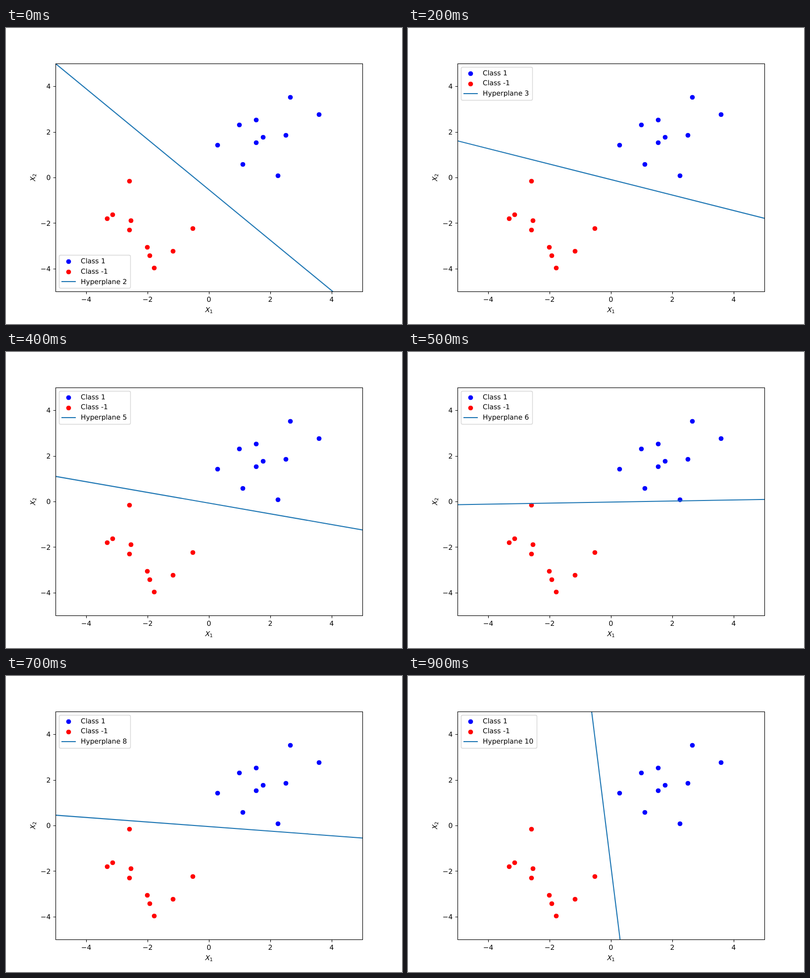
These frames come from a looping animation (800 by 600 pixels, 1 s). An HTML page:

```html
<!DOCTYPE html>
<html lang="en">
<head>
<meta charset="utf-8">
<title>Separating hyperplanes</title>
<style>
  html, body { margin: 0; width: 100%; height: 100%; overflow: hidden; background: #fff; }
  svg { display: block; width: 800px; height: 600px; }
  text { font: 13.89px "DejaVu Sans", Verdana, sans-serif; fill: #000; text-rendering: geometricPrecision; }
  .sub { font-size: 9.72px; }
  .axis { fill: none; stroke: #000; stroke-width: 1.11; }
  .plane { stroke: #1f77b4; stroke-width: 2.083; }
  .box { fill: #fff; fill-opacity: .8; stroke: #ccc; stroke-opacity: .8; stroke-width: 1.39; }
</style>
</head>
<body>
<svg viewBox="0 0 800 600">
  <defs><clipPath id="area"><rect x="100" y="72" width="620" height="462"/></clipPath></defs>
  <g id="dots"></g>
  <g id="planes" clip-path="url(#area)"></g>
  <g id="axes"><rect class="axis" x="100.5" y="72.5" width="620" height="462"/></g>
  <g id="legends"></g>
</svg>
<script>
const STEP = 100, COUNT = 10, SIZE = 10;
const BLUE = '#00f', RED = '#f00';
const LEFT = 107.5, TOP = 78.94, HEIGHT = 67, LOW_SHIFT = 381.12, ROW = 20.94;

const px = x => 410 + 62 * x;
const py = y => 303 - 46.2 * y;
const get = id => document.getElementById(id);

// Mersenne Twister, 53-bit floats in [0, 1)
function twister(seed) {
  const N = 624, s = new Uint32Array(N);
  let pos = N;
  s[0] = seed;
  for (let i = 1; i < N; i++) s[i] = Math.imul(1812433253, s[i - 1] ^ s[i - 1] >>> 30) + i;
  function next() {
    if (pos === N) {
      for (let i = 0; i < N; i++) {
        const y = s[i] & 0x80000000 | s[(i + 1) % N] & 0x7fffffff;
        s[i] = s[(i + 397) % N] ^ y >>> 1 ^ (y & 1 ? 0x9908b0df : 0);
      }
      pos = 0;
    }
    let y = s[pos++];
    y ^= y >>> 11;
    y ^= y << 7 & 0x9d2c5680;
    y ^= y << 15 & 0xefc60000;
    return (y ^ y >>> 18) >>> 0;
  }
  return () => ((next() >>> 5) * 2 ** 26 + (next() >>> 6)) / 2 ** 53;
}

const random = twister(42);

// A pair of normal numbers by the polar method
function normalPair() {
  let a, b, r;
  do {
    a = 2 * random() - 1;
    b = 2 * random() - 1;
    r = a * a + b * b;
  } while (r >= 1 || r === 0);
  const f = Math.sqrt(-2 * Math.log(r) / r);
  return [f * b, f * a];
}

const cloud = mean => Array.from({ length: SIZE }, () => normalPair().map(v => v + mean));
const dotProduct = (w, p) => w[0] * p[0] + w[1] * p[1];

// Draws random directions until one separates the clouds; the line lies midway
function randomPlane(blue, red) {
  for (;;) {
    const w = normalPair();
    const high = Math.min(...blue.map(p => dotProduct(w, p)));
    const low = Math.max(...red.map(p => dotProduct(w, p)));
    if (high > low) return { w, mid: (high + low) / 2 };
  }
}

function add(parent, tag, attrs, text) {
  const el = document.createElementNS('http://www.w3.org/2000/svg', tag);
  for (const key in attrs) el.setAttribute(key, attrs[key]);
  if (text !== undefined) el.textContent = text;
  parent.append(el);
  return el;
}

function dot(parent, x, y, fill) {
  add(parent, 'circle', { cx: Math.round(x) + .5, cy: Math.round(y) + .5, r: 4.86, fill });
}

function drawAxisName(index, place) {
  const g = add(get('axes'), 'g', { transform: place });
  add(g, 'text', { transform: 'skewX(-11)' }, 'X');
  add(g, 'text', { class: 'sub', x: 10, y: 2.2 }, index);
}

function drawAxes() {
  const axes = get('axes');
  for (let v = -4; v <= 4; v += 2) {
    const x = px(v), y = py(v);
    const label = String(v).replace('-', '\u2212');
    add(axes, 'path', { class: 'axis', d: `M${x + .5} 534.5v4.9M100.5 ${Math.round(y) + .5}h-4.9` });
    add(axes, 'text', { x, y: 555, 'text-anchor': 'middle' }, label);
    add(axes, 'text', { x: 90.3, y: Math.round(y + 5.28), 'text-anchor': 'end' }, label);
  }
  drawAxisName(1, 'translate(401.6 576)');
  drawAxisName(2, 'translate(59 311.4) rotate(-90)');
}

function drawPlane({ w, mid }) {
  // From the point nearest the origin, far out both ways
  const k = mid / dotProduct(w, w), far = 20 / Math.hypot(...w);
  const end = t => [px(w[0] * k - w[1] * t), py(w[1] * k + w[0] * t)];
  const [x1, y1] = end(-far), [x2, y2] = end(far);
  return add(get('planes'), 'line', { class: 'plane', x1, y1, x2, y2 });
}

// True if the line passes through the upper left legend
function crossesLegend({ w, mid }, right) {
  const sides = [LEFT, right].flatMap(x => [TOP, TOP + HEIGHT].map(y =>
    dotProduct(w, [(x - 410) / 62, (303 - y) / 46.2]) > mid));
  return new Set(sides).size > 1;
}

function drawLegend(plane, n) {
  const g = add(get('legends'), 'g');
  const box = add(g, 'rect', { class: 'box', x: LEFT, height: HEIGHT, rx: 2.78 });
  const texts = ['Class 1', 'Class -1', `Hyperplane ${n}`].map(label =>
    add(g, 'text', { x: 151 }, label));
  const right = Math.ceil(156.95 + texts[2].getComputedTextLength()) + .5;
  const shift = crossesLegend(plane, right) ? LOW_SHIFT : 0;
  const base = i => 95.5 + shift + ROW * i;

  box.setAttribute('y', Math.round(TOP + shift) + .5);
  box.setAttribute('width', right - LEFT);
  texts.forEach((t, i) => t.setAttribute('y', Math.round(base(i))));
  [BLUE, RED].forEach((fill, i) => dot(g, 126, base(i) - 3.6, fill));
  const y = Math.round(base(2) - 4.86);
  add(g, 'line', { class: 'plane', x1: 112, y1: y, x2: 141, y2: y });
  return g;
}

function showDuring(el, i) {
  const last = i === COUNT - 1;
  const frames = [{ offset: i / COUNT, opacity: 1 }];
  if (i > 0) frames.unshift({ offset: 0, opacity: 0 });
  if (!last) frames.push({ offset: (i + 1) / COUNT, opacity: 0 });
  frames.push({ offset: 1, opacity: last ? 1 : 0 });
  for (const f of frames) f.easing = 'step-end';
  el.animate(frames, { duration: STEP * COUNT, iterations: Infinity }).startTime = 0;
}

const blue = cloud(2), red = cloud(-2);
blue.forEach(([x, y]) => dot(get('dots'), px(x), py(y), BLUE));
red.forEach(([x, y]) => dot(get('dots'), px(x), py(y), RED));
drawAxes();
for (let i = 0; i < COUNT; i++) {
  const plane = randomPlane(blue, red);
  showDuring(drawPlane(plane), i);
  showDuring(drawLegend(plane, i + 1), i);
}
</script>
</body>
</html>
```
